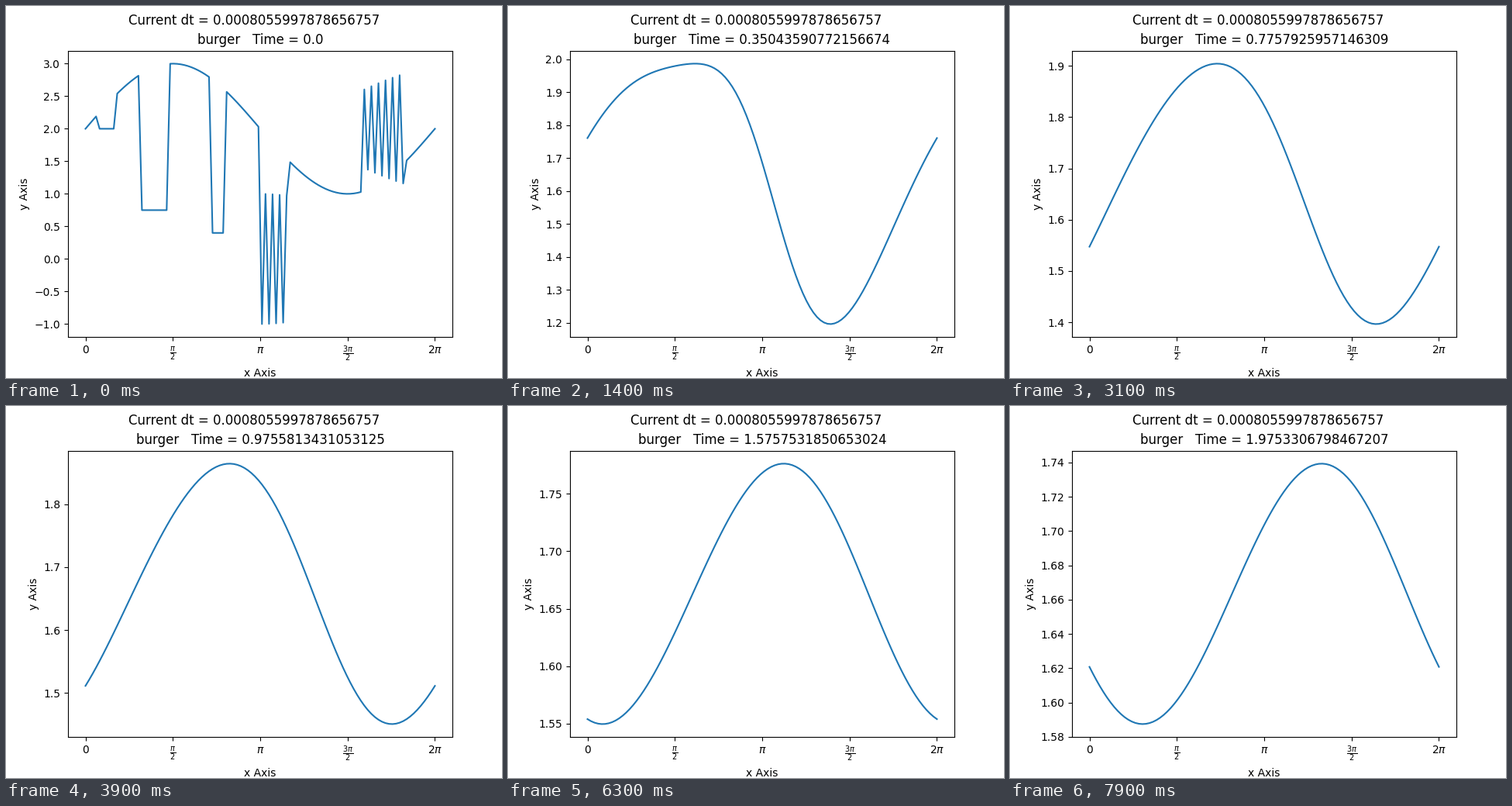
Animation, 640 px wide and 480 px high, one loop 8 s. Source, as a matplotlib script:

```python
import numpy as np
import matplotlib.pyplot as plt
from matplotlib.animation import FuncAnimation

NX = 100
NU = 1.0
DT = 0.0008055997878656757
FRAMES = 80
FRAME_TIME = 0.025

x = np.linspace(0, 2 * np.pi, NX)
dx = x[1] - x[0]


def initial_profile():
    u = 2 + np.sin(x)
    u[4:9] = 2
    u[16:24] = 0.75
    u[36:40] = 0.4
    u[50:58] = -np.sin(50 * x[50:58])
    u[79:91] = 2 + np.sin(50 * x[79:91] - 5)
    return u


def step(u):
    """One explicit step of the viscous Burgers equation, periodic in x."""
    left, right = np.roll(u, 1), np.roll(u, -1)
    advection = u * (right - left) / (2 * dx)
    diffusion = NU * (right - 2 * u + left) / dx**2
    return u + DT * (diffusion - advection)


def solve():
    u, t = initial_profile()[:-1], 0.0
    states = []
    for i in range(FRAMES):
        while t < i * FRAME_TIME:
            u = step(u)
            t += DT
        states.append((t, np.append(u, u[0])))
    return states


states = solve()

fig, ax = plt.subplots(figsize=(6.4, 4.8), dpi=100)
fig.suptitle(f"Current dt = {DT}")
line, = ax.plot(x, states[0][1])
ax.set_xlabel("x Axis")
ax.set_ylabel("y Axis")
ax.set_xticks(
    np.arange(5) * np.pi / 2,
    ["0", r"$\frac{\pi}{2}$", r"$\pi$", r"$\frac{3\pi}{2}$", r"$2\pi$"],
)


def update(i):
    t, u = states[i]
    line.set_ydata(u)
    ax.relim()
    ax.autoscale_view()
    ax.set_title(f"burger   Time = {t}")
    return line,


anim = FuncAnimation(fig, update, frames=FRAMES, interval=100,
                     repeat=True, repeat_delay=0, blit=False)
plt.show()
```
